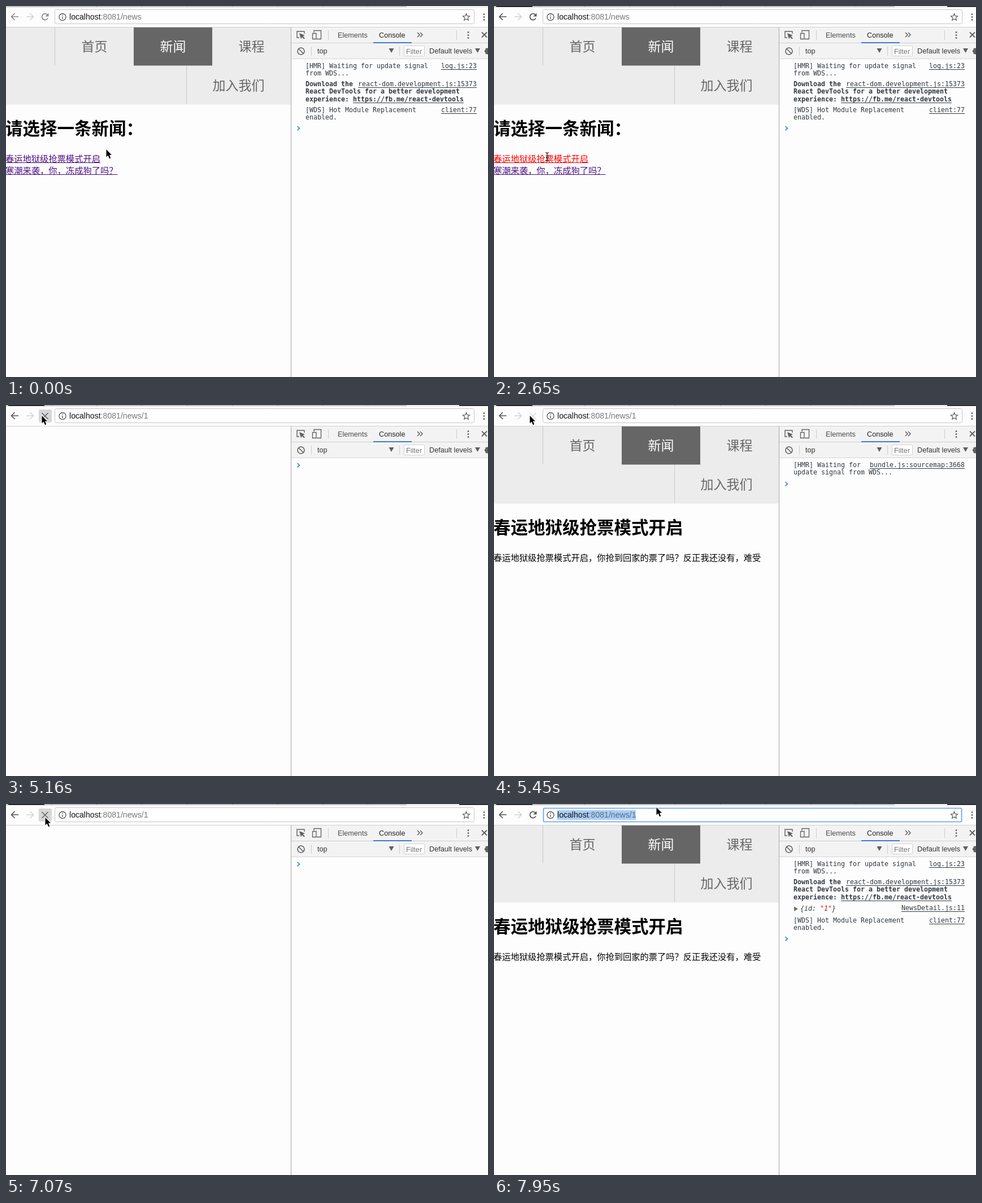
Animation of 853x657 px, one loop 8 s. Source, as an HTML page with a canvas:

```html
<!DOCTYPE html>
<html lang="zh-CN">
<head>
<meta charset="utf-8">
<style>
html, body { margin: 0; width: 100%; height: 100%; overflow: hidden; background: #fdfdfd; }
canvas { display: block; }
</style>
</head>
<body>
<canvas id="stage" width="853" height="657"></canvas>
<script>
const ctx = document.getElementById('stage').getContext('2d');
const LOOP = 8000, STEP = 147.36;
const UI = '12.66px "Liberation Sans", Arial, sans-serif';
const URL_FONT = '14.1px "Liberation Sans", Arial, sans-serif';
const MONO = '11.63px "DejaVu Sans Mono", monospace';
const cjk = (size, weight = 400) => `${weight} ${size}px "Noto Sans CJK SC", "Noto Sans CJK", sans-serif`;
// Turns ASCII punctuation into its full-width form.
const wide = str => str.replace(/[,?:]/g, c => String.fromCharCode(c.charCodeAt(0) + 0xfee0));
const INK = '#303942', LINK = '#4b1182';
const TITLE = '春运地狱级抢票模式开启';
const STORY = wide(TITLE + ',你抢到回家的票了吗?反正我还没有,难受');
const PICK = wide('请选择一条新闻:');
const COLD = wide('寒潮来袭,你,冻成狗了吗?');

// Pointer path: [step, x, y]
const PATH = [
  [0, 177, 253], [1, 172, 262], [2, 162, 278], [4, 185, 225], [7, 244, 67], [8, 244, 67],
  [9, 215, 72], [10, 172, 92], [11, 155, 127], [14, 108, 240], [16, 95, 269], [18, 94, 267],
  [21, 94, 267], [22, 92, 250], [26, 84, 100], [28, 79, 12], [29, 67, 14], [31, 63, 18],
  [40, 63, 18], [42, 66, 42], [43, 66, 46], [46, 69, 23], [50, 69, 23], [54, 287, 5]
];

function pointerAt(n) {
  const i = PATH.findIndex(p => p[0] >= n);
  if (i < 1) return PATH[0].slice(1);
  const [n0, x0, y0] = PATH[i - 1], [n1, x1, y1] = PATH[i];
  const f = (n - n0) / (n1 - n0);
  return [Math.round(x0 + (x1 - x0) * f), Math.round(y0 + (y1 - y0) * f)];
}

function box(x, y, w, h, color) {
  ctx.fillStyle = color;
  ctx.fillRect(x, y, w, h);
}

function frame(x, y, w, h, r, color, fill = '#fff', width = 1) {
  ctx.beginPath();
  ctx.roundRect(x, y, w, h, r);
  ctx.fillStyle = fill;
  ctx.fill();
  ctx.strokeStyle = color;
  ctx.lineWidth = width;
  ctx.stroke();
}

function stroke(d, color, width = 1.5) {
  ctx.strokeStyle = color;
  ctx.lineWidth = width;
  ctx.stroke(new Path2D(d));
}

function shape(d, color) {
  ctx.fillStyle = color;
  ctx.fill(new Path2D(d));
}

function text(str, x, y, font, color, { right = false, under = 0 } = {}) {
  ctx.font = font;
  ctx.fillStyle = color;
  const w = ctx.measureText(str).width;
  if (right) x -= w;
  ctx.fillText(str, x, y);
  if (under) ctx.fillRect(x, Math.round(y + under), w, 1);
  return x + w;
}

function dots(x, y, gap, color) {
  for (let i = -1; i < 2; i++) box(x - 1.2, y + i * gap - 1.2, 2.5, 2.5, color);
}

function drawBrowser(s) {
  const icon = s.focused ? '#565656' : '#8a8a8a';
  box(0, 0, 853, 37, '#fdfdfd');
  box(0, 0, 709, 1, '#d4d4d4');
  box(0, 1, 709, 1, '#aaa');
  for (let x = 80; x < 700; x += 80) box(x, 0, 1, 1, '#888');
  box(709, 1, 144, 1, '#d8d8d8');
  if (s.focused) {
    box(4, 0, 64, 1.5, '#000');
    box(802, 0, 51, 1.5, '#000');
  }
  box(0, 37, 853, 1, '#d0d0d0');

  stroke('M22 19H10M15.5 13L9.5 19L15.5 25', icon, 1.7);
  stroke('M36 19H48M42.5 13L48.5 19L42.5 25', '#d2d2d2', 1.7);
  if (s.reloadHover) {
    ctx.beginPath();
    ctx.roundRect(58, 8, 23, 23, 2);
    ctx.fillStyle = s.pressed ? '#d7d7d7' : '#ececec';
    ctx.fill();
  }
  if (s.stop) {
    stroke('M63.5 14L74.5 25M74.5 14L63.5 25', s.stop === 'faint' ? '#d8d8d8' : '#666', 1.6);
  } else {
    stroke('M74 21.5A5.5 5.5 0 1 1 73 15.3', icon, 1.7);
    shape('M75.5 12.5V18.5H69.5Z', icon);
  }

  if (s.selected) frame(87.5, 7.5, 740, 24, 2, '#659fe8', '#fff', 1.7);
  else frame(86.5, 6.5, 742, 25, 3, '#c6c6c6');
  stroke('M94 19.5a6 6 0 1 0 12 0a6 6 0 1 0 -12 0M100 18.5V23M100 15.5V17', '#5a5a5a', 1.4);
  if (s.selected) box(112, 11, 139, 17, '#a9cdf6');
  const x = text('localhost', 112, 24, URL_FONT, '#111');
  text(':8081/news' + (s.detail ? '/1' : ''), x, 24, URL_FONT, s.selected ? '#5c6b7a' : '#777');

  let star = '';
  for (let i = 0; i < 10; i++) {
    const a = i * Math.PI / 5 - Math.PI / 2, r = i % 2 ? 2.9 : 6.4;
    star += (i ? 'L' : 'M') + (814.5 + r * Math.cos(a)) + ' ' + (20 + r * Math.sin(a));
  }
  stroke(star + 'Z', '#5a5a5a', 1.2);
  dots(846, 19.5, 5, '#5a5a5a');
}

function drawPage(s) {
  box(0, 38, 504, 619, '#fdfdfd');
  if (s.blank) return;
  box(0, 38, 504, 136.5, '#ececec');
  box(86, 38, 1, 67, '#c8c8c8');
  box(319, 105, 1, 69, '#c8c8c8');
  box(226, 38, 139, 67.5, '#666');
  const nav = cjk(23);
  text('首页', 133.5, 80, nav, s.homeHover ? '#000' : '#666');
  text('新闻', 272.5, 80, nav, '#fff');
  text('课程', 411.5, 80, nav, '#666');
  text('加入我们', 365.5, 149, nav, '#666');

  const head = cjk(30.5, 700), body = cjk(15.27);
  if (s.detail) {
    text(TITLE, -1, 228, head, '#000');
    text(STORY, -1, 276, body, '#000');
  } else {
    text(PICK, -1, 228, head, '#000');
    text(TITLE, -1, 276, body, s.linkHover ? '#f00' : LINK, { under: 1 });
    text(COLD, -1, 297, body, LINK, { under: 1 });
  }
}

function drawTools() {
  const icon = '#5f5f5f';
  box(504, 38, 349, 619, '#fdfdfd');
  box(504, 38, 349, 55, '#f3f3f3');
  box(504, 65, 349, 1, '#cdcdcd');
  box(504, 93, 349, 1, '#d5d5d5');
  box(504, 38, 1, 619, '#a6a6a6');

  stroke('M519 56H515V45H528V49', icon, 1.4);
  shape('M519 48L529 52L525.4 53.4L529 57L527.4 58.6L523.8 55L522 58.5Z', icon);
  stroke('M545 47V43.5H557.5V58.5H550', icon, 1.3);
  stroke('M542.5 48.5H549V58.5H542.5Z', icon, 1.3);
  for (const x of [570, 797]) box(x, 43, 1, 17, '#ccc');
  for (const x of [540, 696]) box(x, 72, 1, 16, '#ccc');
  text('Elements', 587, 56, UI, '#4a4a4a');
  text('Console', 660, 56, UI, '#222');
  box(650, 64, 68, 2, '#4379d9');
  stroke('M728 47L732 51L728 55M733 47L737 51L733 55', icon, 1.5);
  dots(818, 51.5, 5, icon);
  stroke('M842 46.5L851 55.5M851 46.5L842 55.5', icon, 1.8);

  stroke('M516 80a6 6 0 1 0 12 0a6 6 0 1 0 -12 0M517.8 75.8L526.2 84.2', icon, 1.6);
  text('top', 551, 84, UI, '#333');
  shape('M677.5 75H686.5L682 83Z', icon);
  frame(704.5, 70.5, 36, 18, 1, '#d2d2d2', '#fff');
  text('Filter', 708, 85, UI, '#777');
  text('Default levels', 749, 84, UI, '#333');
  shape('M830 75H839L834.5 83Z', icon);
  shape('M853 74.5H851L849.5 75L848 76L849 78H847V82H849L848 84L849.5 85L851 85.5H853Z', icon);
}

// Each row type draws itself at baseline y and returns its height.
const link = (str, y) => text(str, 833, y, MONO, INK, { right: true, under: 2 });
const line = (str, y) => text(str, 530, y, MONO, INK);
const ROWS = {
  hmr(y) {
    line('[HMR] Waiting for update signal', y);
    line('from WDS...', y + 13.3);
    link('log.js:23', y);
    return 32;
  },
  early(y) {
    line('[HMR] Waiting for', y);
    line('update signal from WDS...', y + 13.3);
    link('bundle.js:sourcemap:3668', y);
    return 33;
  },
  react(y) {
    const bold = 'bold ' + MONO;
    text('Download the', 530, y, bold, INK);
    text('React DevTools for a better development', 530, y + 13.3, bold, INK);
    const x = text('experience: ', 530, y + 26.7, bold, INK);
    text('https://fb.me/react-devtools', x, y + 26.7, bold, INK, { under: 2 });
    link('react-dom.development.js:15373', y);
    return 46;
  },
  wds(y) {
    line('[WDS] Hot Module Replacement', y);
    line('enabled.', y + 13.3);
    link('client:77', y);
    return 32;
  },
  params(y) {
    const slant = 'italic ' + MONO;
    shape(`M531 ${y - 6.5}V${y + 2}L538 ${y - 2.2}Z`, '#6e6e6e');
    let x = text('{id: ', 542, y + 1, slant, INK);
    x = text('"1"', x, y + 1, slant, '#c41a16');
    text('}', x, y + 1, slant, INK);
    link('NewsDetail.js:11', y);
    return 22;
  }
};

function drawConsole(rows) {
  let y = 110;
  for (const name of rows) y += ROWS[name](y);
  stroke(`M515.5 ${y - 7}L519.5 ${y - 3.3}L515.5 ${y + 0.4}`, '#3b82ec', 1.7);
}

function drawPointer(x, y, beam) {
  ctx.save();
  ctx.translate(x, y);
  ctx.lineJoin = 'round';
  if (beam) {
    stroke('M-3 -7.5Q0 -7.5 0 -5V5Q0 7.5 -3 7.5M3 -7.5Q0 -7.5 0 -5M3 7.5Q0 7.5 0 5M-2 2H2', '#111', 1.2);
  } else {
    const arrow = 'M0.5 1V14.5L3.6 11.6L6 17.2L8.3 16.2L5.9 10.8H10Z';
    stroke(arrow, '#fff', 2);
    shape(arrow, '#000');
  }
  ctx.restore();
}

function stateAt(n) {
  const [x, y] = pointerAt(n), [px, py] = pointerAt(n - 1);
  const detail = n >= 19;
  const blank = n >= 34 && n < 36 || n === 48;
  const early = n >= 36 && n < 38 || n === 49;
  let rows = ['hmr', 'react', 'wds'];
  if (blank) rows = [];
  else if (early) rows = ['early'];
  else if (n >= 38) rows = ['hmr', 'react', 'params', 'wds'];
  else if (detail) rows.push('params');
  const onReload = x > 57 && x < 81 && y < 32;
  return {
    x, y, detail, blank, rows,
    focused: n >= 9,
    homeHover: n >= 9 && px >= 87 && px < 226 && py >= 38 && py < 105,
    linkHover: n >= 16 && !detail,
    beam: n >= 16 && n < 22,
    stop: blank ? 'on' : early ? 'faint' : '',
    pressed: blank,
    reloadHover: onReload && (n >= 29 && n < 36 || n >= 41 && n < 49),
    selected: n >= 53
  };
}

function draw(now) {
  const s = stateAt(Math.floor((now % LOOP + 12.36) / STEP));
  drawBrowser(s);
  drawPage(s);
  drawTools();
  drawConsole(s.rows);
  drawPointer(s.x, s.y, s.beam);
  requestAnimationFrame(draw);
}
requestAnimationFrame(draw);
</script>
</body>
</html>
```
